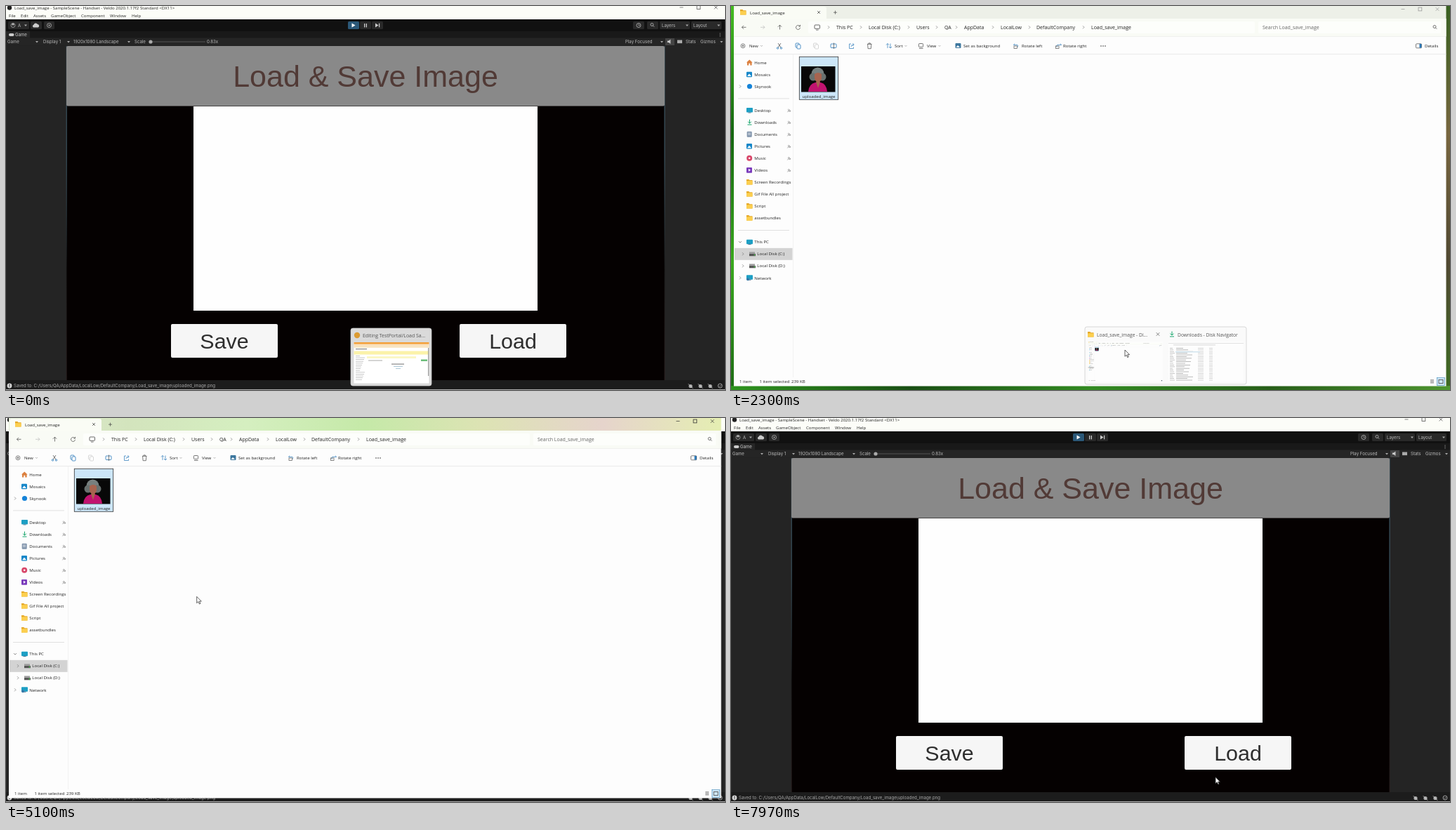
An HTML page that plays this animation: 1024x547 px, repeating every 8 s.

```html
<!DOCTYPE html>
<html lang="en">
<head>
<meta charset="utf-8">
<title>Load and save image</title>
<style>
  html, body { margin: 0; width: 100%; height: 100%; overflow: hidden; background: #000; }
  svg { display: block; width: 100vw; height: 100vh; }
  text { white-space: pre; }
</style>
</head>
<body>
<svg id="stage" viewBox="0 0 1024 547" preserveAspectRatio="none"></svg>
<script>
const UI = "'Open Sans', sans-serif", INTER = "Inter, sans-serif", ARIAL = "'Liberation Sans', Arial, sans-serif";
const LOOP = 8000;

const rect = (x, y, w, h, fill, extra = '') =>
  `<rect x="${x}" y="${y}" width="${w}" height="${h}" fill="${fill}" ${extra}/>`;
const circle = (x, y, r, fill, extra = '') => `<circle cx="${x}" cy="${y}" r="${r}" fill="${fill}" ${extra}/>`;
const line = (d, stroke = '#444', width = .7, fill = 'none') =>
  `<path d="${d}" stroke="${stroke}" stroke-width="${width}" fill="${fill}"/>`;
const shape = (d, fill) => `<path d="${d}" fill="${fill}"/>`;
const text = (x, y, s, size = 6.1, fill = '#222', font = UI, anchor = 'start') =>
  `<text x="${x}" y="${y}" font-size="${size}" fill="${fill}" font-family="${font}" text-anchor="${anchor}">${
    s.replace(/&/g, '&amp;').replace(/</g, '&lt;')}</text>`;
const gradient = (id, colors, vertical) =>
  `<linearGradient id="${id}" ${vertical ? 'x2="0" y2="1"' : ''}>${colors.map((c, i) =>
    `<stop offset="${i / (colors.length - 1)}" stop-color="${c}"/>`).join('')}</linearGradient>`;
const use = (id, x, y, scale) => `<use href="#${id}" transform="translate(${x} ${y}) scale(${scale})"/>`;
const layer = (id, content) => `<g id="${id}">${content}</g>`;

const chevron = (x, y, c = '#777') => line(`M${x - 1} ${y - 2}l2 2l-2 2`, c);
const caret = (x, y, c = '#aaa') => shape(`M${x - 2} ${y - 1}h4l-2 2.4z`, c);
const folder = (x, y) => shape(`M${x} ${y - 4}h3.5l1 1.2h4v6.3h-8.5z`, '#e5a92b') +
  rect(x, y - 1.8, 8.5, 5.4, '#fccf4f', 'rx=".6"');
const download = (x, y, c = '#16a56b') => line(`M${x} ${y - 4}v5.5m-2.4 -2.4l2.4 2.4l2.4 -2.4M${x - 3} ${y + 3.4}h6`, c, 1);
const search = (x, y, c) => line(`M${x + 1.3} ${y + 1.3}l2 2`, c, .8) + circle(x, y, 2, 'none', `stroke="${c}" stroke-width=".8"`);
const cross = (x, y, r, c = '#333') => line(`M${x - r} ${y - r}l${2 * r} ${2 * r}m0 ${-2 * r}l${-2 * r} ${2 * r}`, c, .7);
const windowButtons = (x, y, c) => line(`M${x - 2.5} ${y}h5`, c) +
  rect(x + 22, y - 2.4, 4.8, 4.8, 'none', `stroke="${c}" stroke-width=".8"`) + cross(x + 49, y, 2.4, c);

function editor() {
  const label = (x, y, s, c = '#bbb', size = 6.1) => text(x, y, s, size, c, INTER);
  const menus = [[4, 'File'], [21, 'Edit'], [39, 'Assets'], [64, 'GameObject'], [107, 'Component'], [148, 'Window'], [179, 'Help']];
  const button = (x, caption) => rect(x, 453, 152, 48, '#f6f6f6', 'rx="2"') +
    text(x + 76, 488, caption, 30.4, '#2e2e2e', ARIAL, 'middle');
  const pill = (x, w, fill = '#292929') => rect(x, 22, w, 11, fill, 'rx="1.5"');
  return rect(0, 0, 1024, 547, '#1d1d1d') +
    rect(0, 0, 1024, 19, '#fcfdf8') + circle(5, 2.5, 3.2, '#222') +
    text(12, 5, 'Load_save_image - SampleScene - Handset - Veldo 2020.1.17f2 Standard <DX11>', 6.1) +
    windowButtons(962, 2, '#555') + menus.map(([x, s]) => text(x, 16, s)).join('') +
    rect(0, 19, 1024, 17, '#111') +
    pill(3, 30) + pill(35, 16) + pill(54, 15) +
    circle(10, 26, 1.6, '#bbb') + circle(10, 27.5, 3, 'none', 'stroke="#bbb" stroke-width=".7"') +
    label(17, 30, 'A') + caret(28, 27.5) +
    shape('M39 30.5a2.2 2.2 0 0 1 .6 -4a3 3 0 0 1 5.4 -.4a2.3 2.3 0 0 1 .8 4.4z', '#ccc') +
    circle(61.5, 27.5, 3, 'none', 'stroke="#bbb" stroke-width=".8"') + circle(61.5, 27.5, 1, '#bbb') +
    pill(487, 16, '#2b5878') + pill(504, 16) + pill(521, 16) +
    shape('M492.5 24.5l5 3l-5 3z', '#fff') + rect(510, 25, 1.3, 5.4, '#ccc') + rect(512.7, 25, 1.3, 5.4, '#ccc') +
    shape('M526 24.5l4.5 3l-4.5 3z', '#ccc') + rect(531, 24.7, 1.2, 5.6, '#ccc') +
    pill(893, 16) + pill(913, 16) + pill(931, 43) + pill(976, 43) +
    circle(901, 27.5, 3, 'none', 'stroke="#bbb" stroke-width=".8"') + line('M901 25.5v2.2h1.8', '#bbb') +
    search(920, 26.5, '#bbb') + label(934, 29.8, 'Layers') + caret(970, 27.5) + label(979, 29.8, 'Layout') + caret(1015, 27.5) +
    rect(0, 36, 1024, 9.5, '#191919') + rect(0, 36, 34, 9.5, '#262626') +
    rect(4, 39, 7.5, 4, '#ccc', 'rx="2"') + label(13, 43.2, 'Game', '#ccc') +
    [39, 41, 43].map(y => circle(1017, y, .6, '#bbb')).join('') +
    rect(0, 45.5, 1024, 11, '#252525') +
    label(2, 53.3, 'Game') + caret(44, 51) + label(53, 53.3, 'Display 1') + caret(89, 51) +
    label(96, 53.3, '1920x1080 Landscape') + caret(175, 51) + label(183, 53.3, 'Scale') +
    rect(205, 50.5, 79, 1, '#555') + circle(206, 51, 2.6, '#aaa') + label(286, 53.3, '0.83x') +
    label(882, 53.3, 'Play Focused') + caret(934, 51) + rect(939, 46, 13, 10, '#444') +
    shape('M942 49.5h2l2.4 -2v6.6l-2.4 -2h-2z', '#ccc') + rect(956, 48.5, 7, 4.6, '#aaa') +
    label(968, 53.3, 'Stats') + label(989, 53.3, 'Gizmos') + caret(1019, 51) +
    rect(0, 56.5, 1024, 476.5, '#242424') + rect(86, 57, 852, 476, '#050101') +
    rect(85.8, 57, .8, 476, 'url(#edge)') + rect(937.6, 57, .8, 476, 'url(#edge)') +
    rect(86, 57, 852, 85.5, '#898989', 'rx="2"') +
    text(512, 115, 'Load & Save Image', 43, '#513a36', ARIAL, 'middle') +
    rect(267, 143, 490, 291, '#fefefe') + button(235, 'Save') + button(646, 'Load') +
    rect(0, 533, 1024, 14, '#1c1c1c') + circle(5, 541, 3.4, '#d8d8d8') + rect(4.5, 538.8, 1, 2.6, '#222') + rect(4.5, 542, 1, 1, '#222') +
    label(11, 543.3, 'Saved to: C:/Users/QA/AppData/LocalLow/DefaultCompany/Load_save_image\\uploaded_image.png', '#aaa') +
    [975, 989, 1003].map(x => circle(x, 541.5, 2.6, '#aaa') + line(`M${x - 3.3} 538.2l6.6 6.6`, '#ddd')).join('') +
    circle(1017, 541, 3, 'none', 'stroke="#bbb" stroke-width=".8"') + line('M1015.4 541l1.2 1.2l2 -2.4', '#bbb') +
    rect(0, 546, 1024, 1, '#aaa');
}

function sidebar() {
  const blue = '#1687c9';
  const picture = (x, y) => rect(x, y - 3.7, 8, 7.4, blue, 'rx="1"') + shape(`M${x + 1} ${y + 2.6}l3 -3.6l3 3.6z`, '#fff');
  const screen = (x, y) => rect(x, y - 3.5, 9, 6.5, '#1d9fc4', 'rx=".8"') + rect(x + 2.5, y + 3, 4, .8, '#357');
  const disk = (x, y) => rect(x, y - 2.8, 8, 2.4, '#999') + rect(x, y - .2, 9, 3.2, '#555') + circle(x + 7.5, y + 1.4, .8, '#5e5');
  const icons = {
    home: (x, y) => shape(`M${x} ${y}l4.3 -4l4.3 4h-1v4h-2.3v-2.6h-2v2.6h-2.3v-4z`, '#dc803f'),
    picture, screen, disk, folder,
    cloud: (x, y) => circle(x + 4.5, y, 3.6, '#1583d8'),
    download: (x, y) => download(x + 4.5, y),
    document: (x, y) => rect(x + .7, y - 4, 7, 8, '#8396ad', 'rx="1"') + line(`M${x + 2} ${y - 1.5}h4m-4 2h4`, '#fff'),
    music: (x, y) => circle(x + 4.2, y, 4, '#d8476a') + circle(x + 4.2, y, 1.3, '#fff'),
    video: (x, y) => rect(x, y - 3.8, 8, 7.6, '#7b3dbc', 'rx="1"') + shape(`M${x + 3} ${y - 2}l3 2l-3 2z`, '#fff'),
    network: (x, y) => screen(x, y - .5) + circle(x + 2, y + 2, 2, '#3679a8'),
  };
  const rows = [['Home', 'home'], ['Mosaics', 'picture'], ['Skynook', 'cloud'], null,
    ['Desktop', 'screen'], ['Downloads', 'download'], ['Documents', 'document'], ['Pictures', 'picture'],
    ['Music', 'music'], ['Videos', 'video'], ['Screen Recordings', 'folder'], ['Gif File All project', 'folder'],
    ['Script', 'folder'], ['assetbundles', 'folder'], null,
    ['This PC', 'screen'], ['Local Disk (C:)', 'disk'], ['Local Disk (D:)', 'disk'], ['Network', 'network']];
  return rows.map((row, i) => {
    const y = 80.4 + 17.05 * i;
    if (!row) return rect(10, y, 73, .7, '#d5d5d5');
    const [name, icon] = row, indent = icon === 'disk' ? 4 : 0;
    const pinned = i > 3 && i < 10;
    return (i === 16 ? rect(5, y - 8.4, 82.5, 17, '#d3d3d3') : '') +
      icons[icon](22 + indent, y) + text(33.3 + indent, y + 2.2, name) +
      (pinned ? line(`M80.5 ${y + 2.5}l2 -2m-1.6 -1.4l3 3m-2 -4l3 3l-1.4 .3`, '#777', .8) : '') +
      (i === 2 || i > 15 ? chevron(13 + indent, y) : i === 15 ? line(`M11 ${y - 1}l2 2l2 -2`, '#555') : '');
  }).join('');
}

function explorer() {
  const crumbs = [[150, 'This PC'], [196, 'Local Disk (C:)'], [264, 'Users'], [304, 'QA'], [332, 'AppData'],
    [384, 'LocalLow'], [435, 'DefaultCompany'], [513, 'Load_save_image']];
  const chevrons = [139, 185, 253, 293, 321, 373, 425, 502];
  const commands = [[26, 'New'], [233, 'Sort'], [279, 'View'], [331, 'Set as background'], [414, 'Rotate left'], [473, 'Rotate right'], [988, 'Details']];
  const blue = '#2878b8';
  const page = (x, c) => rect(x - 3, 53, 5, 6, 'none', `rx="1" stroke="${c}" stroke-width=".8"`) +
    rect(x - 1, 55, 5, 6, '#fff', `rx="1" stroke="${c}" stroke-width=".8"`);
  const portrait = rect(100, 86, 48.5, 36.5, '#080808') +
    shape('M110 122q1 -11 10 -13h8q8 2 9 13z', '#c1136f') +
    circle(123.5, 96.5, 9, '#77807f') + circle(117, 101, 5.5, '#69716f') + circle(130, 101, 5.5, '#69716f') +
    shape('M119 97q5 -4 10 0v6q-1 5 -5 6q-4 -1 -5 -6zM121 108h6l-3 9z', '#a8644f');
  return rect(4, 18, 1014.5, 523.5, '#fdfdfd') +
    shape('M5 18.5V4q0 -3 3 -3H133q3 0 3 3v14.5z', '#fafcf5') +
    folder(13, 9) + text(27, 11.5, 'Load_save_image') + cross(125, 9, 1.9) + line('M146 9.2h5m-2.5 -2.5v5') +
    rect(4, 18, 1014.5, 25, '#f9fbf5') +
    rect(110, 22, 636, 17, '#fdfefb', 'rx="2"') + rect(751, 22, 260, 17, '#fdfefb', 'rx="2"') +
    line('M21.5 30.3h-6m2.5 -2.5l-2.5 2.5l2.5 2.5M69.5 33.5v-6.4m-2.7 2.7l2.7 -2.7l2.7 2.7') +
    line('M42 30.3h6m-2.5 -2.5l2.5 2.5l-2.5 2.5', '#bbb') +
    line('M98 28.8a3 3 0 1 0 .5 2m0 -4v2.2h-2.2') +
    rect(119, 27, 7.5, 5.4, 'none', 'rx="1" stroke="#444" stroke-width=".8"') + line('M121 34.2h3.6') +
    chevrons.map(x => chevron(x, 30.3)).join('') + crumbs.map(([x, s]) => text(x, 32.9, s, 7)).join('') +
    text(757, 32.9, 'Search Load_save_image', 7, '#666') + search(1002, 29.5, '#555') +
    rect(4, 43, 1014.5, .6, '#e8eae4') + rect(4, 68.4, 1014.5, .7, '#e2e2e2') +
    circle(17, 56.8, 3, 'none', 'stroke="#555" stroke-width=".7"') + line('M15.3 56.8h3.4m-1.7 -1.7v3.4') +
    line('M67 53l4 6m0 -6l-4 6') + circle(66.5, 60, 1.2, 'none', `stroke="${blue}" stroke-width=".8"`) +
    circle(71.5, 60, 1.2, 'none', `stroke="${blue}" stroke-width=".8"`) +
    page(95, blue) + page(120.5, '#ccc') +
    rect(142, 54, 8, 5.5, 'none', `rx="1" stroke="${blue}" stroke-width=".8"`) + line('M146.5 52.5v8.5') +
    line('M171 54h-2.5v6.5h6v-2M171 58q0 -3 4 -3m-1.8 -2l2 2l-2 2', blue) +
    line('M194 54.3h6.5m-4.5 0v-1.4h2.4v1.4m-3.8 0l.5 6.4h4.2l.5 -6.4') +
    line('M223 60v-6.5m-2 2l2 -2l2 2M227 53.5v6.5m-2 -2l2 2l2 -2', blue) +
    rect(267.5, 53.5, 6, 5, 'none', 'rx=".8" stroke="#555" stroke-width=".8"') + line('M268 60.5h5.5') +
    rect(319.5, 53, 8, 7, '#3d779e', 'rx="1"') + shape('M320.5 59l2.5 -3l3 3z', '#fff') +
    line('M404 53.5l-1.5 2h5.5q1.5 1 0 3M469 53.5l1.5 2h-6q-1.5 1 0 3', blue) +
    rect(403, 57, 4.5, 3.5, 'none', 'stroke="#555" stroke-width=".7"') + rect(462.5, 57, 4.5, 3.5, 'none', 'stroke="#555" stroke-width=".7"') +
    [43.5, 249, 297].map(x => line(`M${x - 1.5} 56l1.5 1.5l1.5 -1.5`, '#888', .6)).join('') +
    [527, 530, 533].map(x => circle(x, 57, .8, '#333')).join('') +
    rect(975.5, 53.8, 8, 6, 'none', 'rx="1" stroke="#444" stroke-width=".7"') + rect(980.5, 54, 2.8, 5.6, blue) +
    commands.map(([x, s]) => text(x, 59, s)).join('') +
    rect(88, 69, .6, 460, '#ececec') + sidebar() +
    rect(97.3, 72.3, 55.4, 61, '#cce6f8', 'stroke="#333" stroke-width=".8"') + portrait +
    text(125, 130.6, 'uploaded_image', 6.1, '#222', UI, 'middle') +
    text(12, 537.4, '1 item') + text(40.5, 537.4, '1 item selected') + text(86, 537.4, '239 KB') +
    line('M996 532.8h5m-5 2h5m-5 2h5', '#555', .8) +
    rect(1005.5, 529.5, 11, 11, '#cfe7f6', 'stroke="#3b87b9" stroke-width=".6"') +
    rect(1008, 532.5, 6, 5, 'none', 'stroke="#444" stroke-width=".8"');
}

const panel = (x, y, w, fill) => rect(x, y, w, 82, fill, 'rx="3" stroke="#c9c9c9" stroke-width=".7"');

function browserPopup() {
  const rows = Array.from({ length: 14 }, (_, i) => rect(498, 498 + i * 2.6, 6 + (i * 7) % 8, .8, '#bbb')).join('');
  return panel(491, 459, 115, '#dadada') + circle(500, 469, 4.2, '#dc9b32') +
    text(508, 472, 'Editing TestPortal/Load Sa...', 6.9, '#555') +
    rect(495.5, 479, 107, 58.5, '#fff') + rect(495.5, 479, 107, 2.7, '#f3a13b') +
    rect(495.5, 482.5, 107, 1.2, '#f7c98a') + rect(495.5, 484.5, 107, 2, '#f6dcae') +
    rect(498, 488, 16, 1.2, '#888') + rect(495.5, 491.5, 107, 5, '#fbf2a9') + rect(514, 499, 70, 3, '#fbf7c5') +
    rect(516, 504.5, 20, 1, '#aaa') + rect(591, 503.5, 9, 2.4, '#65bb74') +
    rect(549, 509.5, 18, 1.2, '#888') + rect(552, 513, 13, .8, '#9bc') + rect(555, 516, 7, .8, '#9bc') +
    rect(601, 487, 1.2, 40, '#999') + rows;
}

function folderPopup() {
  const list = Array.from({ length: 20 }, (_, i) => {
    const y = 487 + i * 2.4;
    return rect(625, y, 4 + (i * 5) % 4, .8, '#bbb') + rect(634, y, 10 + (i * 7) % 15, .8, '#aaa') +
      rect(665, y, 8, .8, '#ccc') + rect(681, y, 5, .8, '#ccc');
  }).join('');
  return folder(508, 468) + download(628, 467.5) + text(636, 470.7, 'Downloads - Disk Navigator', 6.7, '#555') +
    rect(508, 478, 107, 57.5, '#fdfdfd') + use('explorer', 508, 478, .1045) +
    rect(623, 478, 107, 57.5, '#fdfdfd') + rect(623, 480, 107, .8, '#ddd') +
    rect(630, 482.5, 60, .8, '#ccc') + list + rect(633, 492, 35, 1.4, '#cfe3ee');
}

const editorPopup = panel(514.5, 457, 116, '#f8f8f8') + circle(523, 467.5, 3.8, '#2b2b2b') +
  text(531.5, 470.7, 'Load_save_image - SampleS...', 6.9, '#555') + use('editor', 519, 478.7, .1045);

const strip = (fill, buttons) => rect(4, 0, 1014.5, 18.5, fill) + windowButtons(957, 4.5, buttons);

stage.innerHTML = `<defs>
  ${gradient('edge', ['#4d7183', '#4d7183', '#161616', '#2c2020'], true)}
  ${gradient('tint', ['#e2ebd5', '#d3e4bd', '#d5efc0', '#c5e9a8', '#dde3b4', '#e6d4cc', '#e5eeb2'])}
  ${gradient('glass', ['#e6e6e6', '#d8d8d8', '#efefef', '#f3f3f3'])}
  ${gradient('grass', ['#44bd21', '#146510', '#39a91d', '#1d6b14'], true)}
  ${gradient('soil', ['#386020', '#78663f', '#504831', '#3d6c22'], true)}
  ${gradient('ground', ['#2e941e', '#194e14', '#328a21', '#275e19', '#4e9530'])}
  ${layer('editor', editor())}${layer('explorer', explorer())}
</defs>
<use href="#editor"/>
${layer('fileWindow',
  layer('wallpaper', rect(0, 0, 5, 547, 'url(#grass)') + rect(1018, 0, 6, 547, 'url(#soil)') + rect(0, 541, 1024, 6, 'url(#ground)')) +
  layer('activeStrip', strip('url(#tint)', '#333')) + layer('peekStrip', strip('#edf0e8', '#999')) + '<use href="#explorer"/>')}
${layer('browserTip', browserPopup())}
${layer('folderTip', layer('glassPanel', panel(504, 457, 230, 'url(#glass)')) + layer('lightPanel', panel(504, 457, 230, '#fafafa')) +
  folderPopup() + layer('longTitle', text(521, 470.7, 'Load_save_image - Disk Navi...', 6.7, '#555')) +
  layer('hoverTitle', text(521, 470.7, 'Load_save_image - Di...', 6.7, '#555') + cross(608, 467.5, 2.3, '#555')))}
${layer('editorTip', editorPopup)}
${layer('pointer', line('M0 0V9.2L2.2 7.2L3.7 10.6L5.2 9.9L3.7 6.7H6.6Z', '#222', .7, '#fff'))}`;

const el = id => document.getElementById(id);
const ramp = (t, start, length) => Math.min(1, Math.max(0, (t - start) / length));
const fade = (id, value) => {
  el(id).setAttribute('opacity', value);
  el(id).style.display = value > 0 ? '' : 'none';
};

// time, x, y
const path = [[0, 549, 550], [800, 600, 552], [1670, 606, 549], [2050, 561, 490], [2700, 561, 490], [3500, 147, 124],
  [4500, 147, 124], [6100, 540, 535], [6400, 540, 535], [6650, 572, 550], [7600, 572, 548], [7720, 590, 515], [7960, 690, 511.5], [8000, 690, 511.5]];

function pointerAt(t) {
  const i = path.findIndex(([time]) => time > t);
  const [t0, x0, y0] = path[i - 1], [t1, x1, y1] = path[i];
  const p = (t - t0) / (t1 - t0), eased = p * p * (3 - 2 * p);
  return [x0 + (x1 - x0) * eased, y0 + (y1 - y0) * eased];
}

function draw() {
  const t = performance.now() % LOOP;
  const hover = t > 1950, opened = t > 2640;
  fade('fileWindow', t < 7740 ? ramp(t, 2030, 150) : 0);
  fade('wallpaper', opened ? 0 : 1);
  fade('peekStrip', opened ? 0 : 1);
  fade('activeStrip', opened ? 1 : 0);
  fade('browserTip', 1 - ramp(t, 760, 100));
  fade('folderTip', ramp(t, 860, 120) * (1 - ramp(t, 2640, 120)));
  fade('glassPanel', ramp(t, 2030, 150) < 1 ? 1 : 0);
  fade('lightPanel', ramp(t, 2030, 150));
  fade('longTitle', hover ? 0 : 1);
  fade('hoverTitle', hover ? 1 : 0);
  fade('editorTip', ramp(t, 6850, 150) * (1 - ramp(t, 7740, 100)));
  el('pointer').setAttribute('transform', `translate(${pointerAt(t)})`);
  requestAnimationFrame(draw);
}
draw();
</script>
</body>
</html>
```
